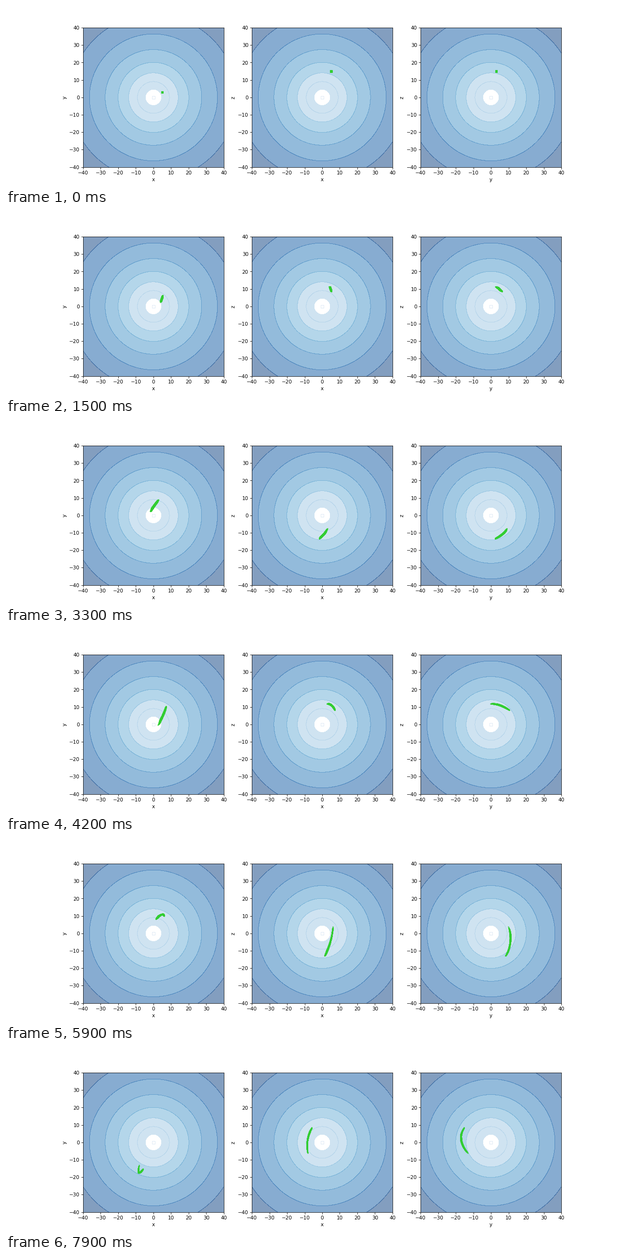
Recreate the animation shown at these times as a matplotlib script. Size 1280 px wide and 376 px high, loop 8000 ms.

```python
import numpy as np
import matplotlib.pyplot as plt
from matplotlib.animation import FuncAnimation
from matplotlib.patches import Rectangle

W, H, DPI = 1280, 376, 75
FRAMES, INTERVAL = 80, 100
LIMIT = 40

# Central halo: potential -GM / (r + A)
GM, A = 14534.0, 50.0
START = np.array([5.0, 3.0, 15.0])
VELOCITY = np.array([3.37, 6.36, 0.44])
HALF_SIZE = 0.36
STARS = 2500
SUBSTEPS = 20

RADII = [0, 4.62, 9.1, 14.1, 20.1, 27.45, 36.4, 47.4, 60]
PALE = (161 / 255, 201 / 255, 229 / 255)


def accel(pos):
    r = np.linalg.norm(pos, axis=1, keepdims=True)
    return -GM * pos / (r * (r + A) ** 2)


def simulate():
    """Leapfrog the cluster and return its positions for every frame."""
    rng = np.random.default_rng(4)
    pos = START + rng.uniform(-HALF_SIZE, HALF_SIZE, (STARS, 3))
    vel = np.tile(VELOCITY, (STARS, 1))
    dt = 1 / SUBSTEPS
    track = [pos.copy()]
    acc = accel(pos)
    for _ in range(FRAMES - 1):
        for _ in range(SUBSTEPS):
            vel += acc * dt / 2
            pos += vel * dt
            acc = accel(pos)
            vel += acc * dt / 2
        track.append(pos.copy())
    return track


def draw_halo(ax):
    side = np.linspace(-LIMIT, LIMIT, 100)
    gx, gy = np.meshgrid(side, side)
    blues = plt.get_cmap("Blues")
    colors = ["white", PALE, PALE] + [blues((k + 0.5) / 9) for k in range(4, 9)]
    # Translucent bands overlap by a pixel, which gives the thin rings
    ax.contourf(gx, gy, np.hypot(gx, gy), levels=RADII, colors=colors, alpha=0.5)
    ax.add_patch(Rectangle((-0.8, -0.8), 1.6, 1.6, fill=False,
                           edgecolor="#d9e6f4", linewidth=0.8))


def make_panel(ax, xlabel, ylabel):
    draw_halo(ax)
    ticks = range(-LIMIT, LIMIT + 1, 10)
    ax.set(xlim=(-LIMIT, LIMIT), ylim=(-LIMIT, LIMIT), xticks=ticks,
           yticks=ticks, xlabel=xlabel, ylabel=ylabel)
    dots, = ax.plot([], [], "s", color="limegreen", markersize=1.9,
                    markeredgewidth=0)
    return dots


track = simulate()
# The tiny margin keeps the pixel size from rounding down
fig, axes = plt.subplots(1, 3, figsize=((W + 1e-6) / DPI, (H + 1e-6) / DPI),
                         dpi=DPI)
names = "xyz"
planes = [(0, 1), (0, 2), (1, 2)]
clouds = [make_panel(ax, names[i], names[j]) for ax, (i, j) in zip(axes, planes)]


def update(frame):
    pos = track[frame]
    for dots, (i, j) in zip(clouds, planes):
        dots.set_data(pos[:, i], pos[:, j])
    return clouds


anim = FuncAnimation(fig, update, frames=FRAMES, interval=INTERVAL,
                     repeat=True, repeat_delay=0)
plt.show()
```
